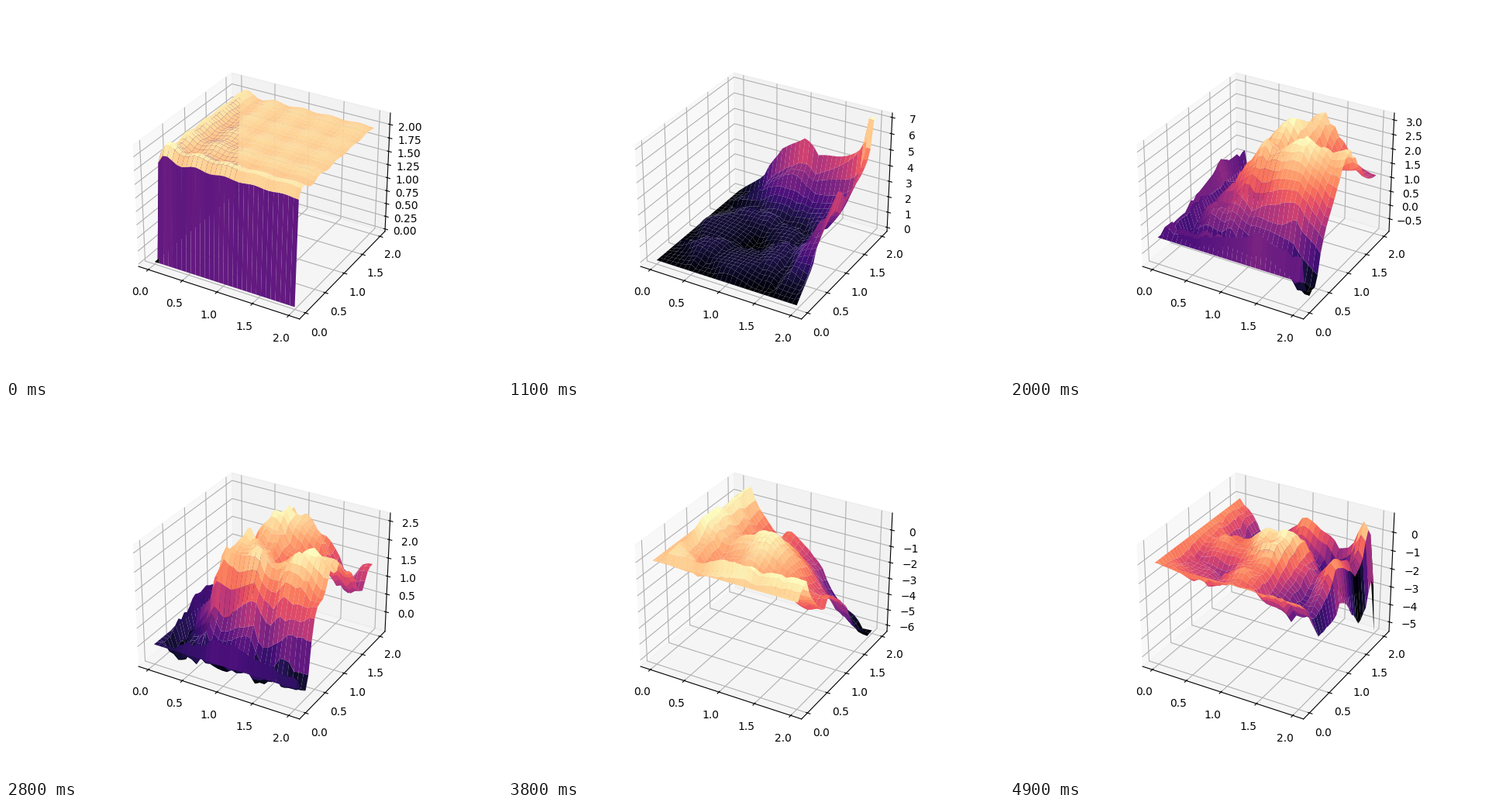
These frames come from a looping animation (640x480 px, 5000 ms). A matplotlib script:

```python
import numpy as np
import matplotlib.pyplot as plt
from matplotlib.animation import FuncAnimation
from matplotlib.ticker import AutoLocator

# Standing waves on a square membrane: fixed along x = 0 and y = 0,
# free along x = 2 and y = 2, released from a flat height.
SIDE = 2.0
HEIGHT = 2.0
POINTS = 31
MODES = 50
FRAMES = 50
STEP = 2.0  # distance a wave travels per frame

x = np.linspace(0, SIDE, POINTS)
X, Y = np.meshgrid(x, x)
odd = 2 * np.arange(MODES) + 1
wavenumber = odd * np.pi / (2 * SIDE)
shapes = np.sin(np.outer(x, wavenumber))
weights = HEIGHT * (4 / np.pi) ** 2 / np.outer(odd, odd)
omega = np.hypot(wavenumber[:, None], wavenumber[None, :])


def membrane(frame):
    return shapes @ (weights * np.cos(omega * STEP * frame)) @ shapes.T


def padded(low, high, margin=0.0):
    """Widen a range by a margin and by the thin border of the 3D box."""
    pad = margin * (high - low)
    low, high = low - pad, high + pad
    border = (high - low) / 48
    return low - border, high + border


def inner_ticks(low, high):
    """Round tick values that stay clear of the border."""
    ticks = AutoLocator().tick_values(low, high)
    return ticks[(ticks >= low - 1e-9) & (ticks <= high + 1e-9)]


fig = plt.figure(figsize=(6.4, 4.8), dpi=100)
ax = fig.add_subplot(projection="3d")
surface = None


def draw(frame):
    global surface
    if surface is not None:
        surface.remove()
    Z = membrane(frame)
    low, high = Z.min(), Z.max()
    surface = ax.plot_surface(X, Y, Z, cmap="magma")
    ax.set_zticks(inner_ticks(low, high))
    ax.set_xlim(*padded(0, SIDE, 0.05))
    ax.set_ylim(*padded(0, SIDE, 0.05))
    ax.set_zlim(*padded(low, high))
    return (surface,)


animation = FuncAnimation(fig, draw, frames=FRAMES, init_func=lambda: draw(0),
                          interval=100, repeat=True, repeat_delay=0, blit=False)
plt.show()
```
